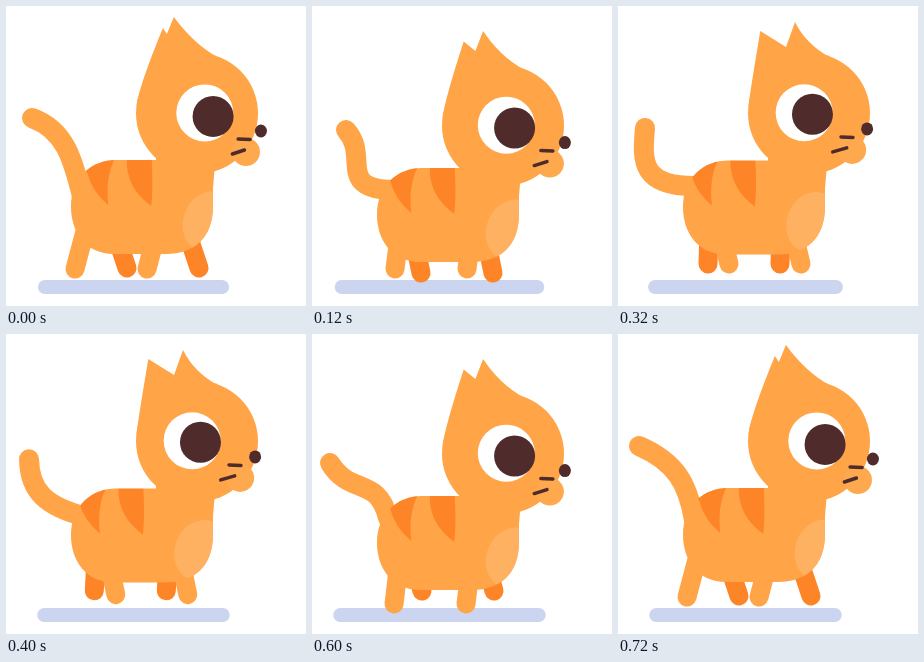
Recreate the animation shown at these times as an HTML page with a canvas. Size 300 px wide and 300 px high, loop 0.76 s.

```html
<!DOCTYPE html>
<html lang="en">
<head>
<meta charset="utf-8">
<title>Walking cat</title>
<style>
  html, body { margin: 0; height: 100%; overflow: hidden; background: #fff; }
  canvas { display: block; width: 100vw; height: 100vh; }
</style>
</head>
<body>
<canvas width="300" height="300"></canvas>
<script>
const ctx = document.querySelector('canvas').getContext('2d');
const LOOP = 760, STEP = 40;
const FUR = '#ffa447', DARK_FUR = '#fd8427', PALE_FUR = '#ffb162', MUZZLE = '#ffa94f';
const BROWN = '#4f2b2b', SHADOW = '#ccd5ef';

// Poses of the tail and feet at these times; splines join them.
const TIMES = [0, 120, 240, 320, 480, 600, 720];
const TAIL = [ // tip, two control points, root
  [26, 34, 33, 27, 20, 18, 21], [112, 124, 125, 122, 129, 129, 112],
  [62, 58, 33, 24, 26, 38, 58], [125, 150, 165, 155, 160, 162, 128],
  [68, 24, 28, 22, 58, 66, 70], [160, 182, 186, 182, 162, 142, 150],
  [76, 80, 82, 82, 80, 76, 76], [190, 184, 182, 180, 186, 184, 186]
];
const NEAR_FOOT = [[69, 83, 101, 111, 104, 82, 69], [263, 263, 265, 258, 265, 270, 263]];
const FAR_FOOT = [[121, 109, 100, 90, 91, 110, 121], [262, 267, 266, 258, 257, 257, 262]];

function spline(values, t) {
  const n = TIMES.length;
  const value = j => values[(j + n) % n];
  const time = j => TIMES[(j + n) % n] + LOOP * Math.floor(j / n);
  const slope = j => (value(j + 1) - value(j - 1)) / (time(j + 1) - time(j - 1));
  let i = n - 1;
  while (TIMES[i] > t) i--;
  const d = time(i + 1) - time(i), u = (t - time(i)) / d, v = 1 - u;
  return v * v * ((1 + 2 * u) * value(i) + u * d * slope(i))
       + u * u * ((1 + 2 * v) * value(i + 1) - v * d * slope(i + 1));
}

function ellipse(color, x, y, rx, ry = rx, angle = 0) {
  ctx.fillStyle = color;
  ctx.beginPath();
  ctx.ellipse(x, y, rx, ry, angle, 0, 2 * Math.PI);
  ctx.fill();
}

function fill(color, path) {
  ctx.fillStyle = color;
  ctx.fill(new Path2D(path));
}

function stroke(color, width, path) {
  ctx.strokeStyle = color;
  ctx.lineWidth = width;
  ctx.stroke(new Path2D(path));
}

function drawLegs(color, foot, top, t) {
  const [x, y] = foot.map(track => spline(track, t));
  for (const dx of [0, 72])
    stroke(color, 19, `M${0.35 * x + 60 + dx} ${top + 52}L${x + dx} ${y}`);
}

const TORSO = new Path2D(
  'M110 0H150V-20H211L207 28V46C207 78 188 94 160 94H108C80 94 65 72 65 47C65 17 86 0 110 0Z');

function drawTorso(top, turn) {
  ctx.save();
  ctx.translate(0, top);
  ctx.fillStyle = FUR;
  ctx.fill(TORSO);
  ctx.clip(TORSO);
  ctx.translate(4.3 * turn, 0);
  fill(DARK_FUR, 'M68 0L77 13Q82 32 98 45Q95 18 104 0Z');
  fill(DARK_FUR, 'M116.5 0Q116 28 141 46Q143 28 141.5 0Z');
  ellipse(PALE_FUR, 199, 62, 26, 31, 0.35);
  ctx.restore();
}

function drawHead(bob, turn) {
  const lift = 8.2 * bob;
  const eyeX = 192.4 + 6.5 * turn, eyeY = 112.7 + lift + 0.5 * turn;
  const noseX = 252 + 3 * turn, noseY = 129.8 + lift + 1.5 * turn;
  const cy = eyeY + 0.5;

  ellipse(FUR, 191, cy, 61, 60.5);
  fill(FUR, `M130.5 ${cy - 8}Q133 ${cy - 27} ${149.5 + 7.5 * turn} ${29.4 + lift - 1.1 * turn}
    L${164.5 - 3.7 * turn} ${40.5 + lift - 6.3 * turn}
    L${172.5 - 4.7 * turn} ${19.4 + lift - 2.1 * turn}
    Q188 ${cy - 69} 212 ${cy - 56}L191 ${cy}Z`);
  ellipse(MUZZLE, noseX - 15, noseY + 21, 14);
  ellipse(BROWN, noseX, noseY, 6, 6.5);
  ellipse('#fff', eyeX, eyeY, 28.5);
  ellipse(BROWN, eyeX + 8.3, eyeY + 2.5 + turn, 20.5);
  stroke(BROWN, 3.5, `M${227.5 + 4.7 * turn} ${noseY + 8}l12 .5
    M${220.5 + 6 * turn} ${noseY + 23}L${233.5 + 5 * turn} ${noseY + 19}`);
}

function draw(t) {
  const swing = Math.cos(2 * Math.PI * (t - 170) / (LOOP / 2));
  const bob = swing + 0.2 * swing * swing; // two bounces per stride
  const angle = 2 * Math.PI * (t + 20) / LOOP;
  const turn = Math.cos(angle) - 0.13 * Math.sin(angle) ** 2;
  const top = 158 + 5.3 * bob;
  const reach = 94.5 + 6 * Math.cos(2 * Math.PI * (t - 180) / (LOOP / 2));

  ctx.clearRect(0, 0, 300, 300);
  ctx.lineCap = 'round';
  stroke(SHADOW, 14, `M${127.5 - reach} 281H${127.5 + reach}`);
  drawLegs(DARK_FUR, FAR_FOOT, top, t);
  drawLegs(FUR, NEAR_FOOT, top, t);
  const [x, y, ...curve] = TAIL.map(track => spline(track, t));
  stroke(FUR, 20, `M${x} ${y}C${curve}`);
  drawTorso(top, turn);
  drawHead(bob, turn);
}

function tick() {
  draw(Math.floor(performance.now() % LOOP / STEP) * STEP);
  requestAnimationFrame(tick);
}
tick();
</script>
</body>
</html>
```
